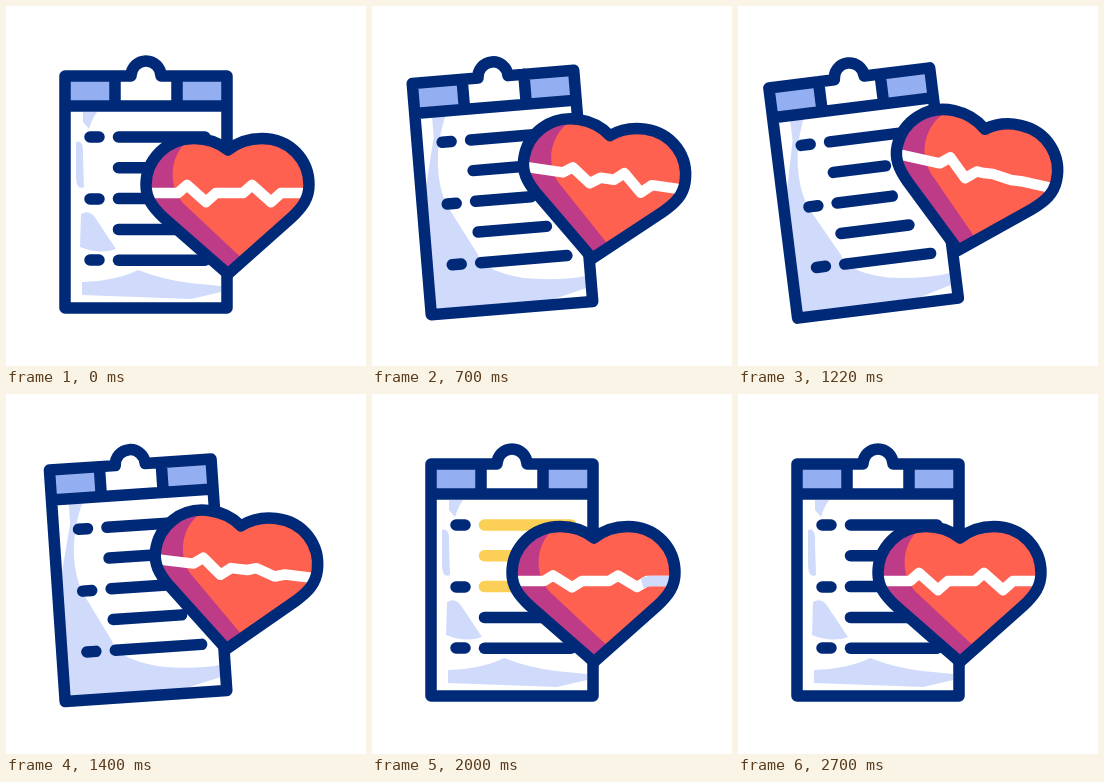
Animation of 360 by 360 pixels, one loop 3.02 s. Source, as an HTML page:

```html
<!DOCTYPE html>
<html>
<head>
<meta charset="utf-8">
<style>
  html, body { margin: 0; height: 100%; overflow: hidden; background: #fff; }
  svg { display: block; width: 100vw; height: 100vh; }
  .ink { fill: none; stroke: #002a78; stroke-width: 11.5; stroke-linecap: round; stroke-linejoin: round; }
  .shade { fill: #d0dbfc; }
</style>
</head>
<body>
<svg viewBox="0 0 360 360">
  <defs>
    <path id="heart" d="M222 144C212 136 200 132.500 188 132.500C160 132.500 140 154 140 179C140 192 146 201 158 212L222 268L285 212C297 201 303 192 303 179C303 154 284 132.500 256 132.500C244 132.500 232 136 222 144Z"/>
    <clipPath id="inside"><use href="#heart"/></clipPath>
  </defs>
  <g id="board">
    <path fill="#fff" d="M59 70H125A15 15 0 0 1 155 70H221V302H59Z"/>
    <path fill="#93aff1" d="M59 70H109V100H59ZM171 70H221V100H171Z"/>
    <path id="tiltShade" class="shade" d="M76 104H90C76 135 74 170 84 195L110 245Q112 262 154 273Q190 279 216 276V288L180 297H64V175L76 125Z"/>
    <path id="restShade" class="shade" d="M77 106H91Q86 113 83 123L77 116ZM70 136Q78 133 77 150L78 181Q70 185 70 170ZM75 208Q84 203 90 213L110 243Q94 249 74 241ZM76 276Q110 275 132 264Q158 274 184 277L215 280V286L185 293L76 289Z"/>
    <path class="ink" d="M59 70H125A15 15 0 0 1 155 70H221V302H59ZM59 100H221M109 70V100M171 70V100M84 131H93M84 193H93M84 254H93"/>
    <g id="lines"></g>
  </g>
  <g id="love">
    <use href="#heart" fill="#bd3b87"/>
    <g clip-path="url(#inside)">
      <path fill="#ff6151" d="M188 130C162 146 161 180 178 198L242 258L315 215V120H188Z"/>
      <g fill="none" stroke-width="10.500" stroke-linejoin="round">
        <path id="pulse" stroke="#fff"/>
        <path id="pulseEnd" stroke="#d0dbfc" d="M270 189L278 187H305"/>
      </g>
    </g>
    <use href="#heart" class="ink"/>
  </g>
</svg>
<script>
const LOOP = 3020;
const BASE = 187; // resting height of the heartbeat line
const $ = id => document.getElementById(id);

$('lines').innerHTML = [199, 165, 168, 181, 199]
  .map((end, i) => `<path class="ink" d="M112.500 ${131 + i * 30.8}H${end}"/>`).join('');
const lines = [...$('lines').children];

// Smooth rise from 0 to 1 and back, centred on a time
const bump = (t, centre, half) =>
  Math.abs(t - centre) < half ? (1 + Math.cos(Math.PI * (t - centre) / half)) / 2 : 0;

// One beat: lead-in, peak, trough, lead-out
const beat = (x, size) =>
  `L${x} ${BASE}L${x + 9} ${BASE - 8 * size}L${x + 28} ${BASE + 9 * size}L${x + 38} ${BASE}`;

const show = (id, visible) => { $(id).style.display = visible ? '' : 'none'; };

function draw(t) {
  const swing = bump(t, 1030, 700);
  $('board').setAttribute('transform', `rotate(${-8.6 * swing} 141 302)`);
  $('love').setAttribute('transform', `rotate(${15 * swing} 330 248)`);

  const tilted = swing > 0.12;
  show('tiltShade', tilted);
  show('restShade', !tilted);

  // The beats fade in turn and drift together while the heart leans
  const left = 1 - 0.7 * bump(t, 900, 320) - 0.6 * bump(t, 1750, 500);
  const right = 1 - 0.9 * bump(t, 1250, 380) - 0.5 * bump(t, 1800, 500);
  $('pulse').setAttribute('d',
    `M138 ${BASE}${beat(172 + 16 * swing, left)}${beat(237 - 8 * swing, right)}H305`);
  show('pulseEnd', t >= 1960 && t < 2080);

  lines.forEach((line, i) => {
    const on = t >= 1740 + i * 100 && t < 2140 + i * 100;
    line.style.stroke = on ? '#fccf56' : '';
  });
}

function loop() {
  draw(performance.now() % LOOP);
  requestAnimationFrame(loop);
}
loop();
</script>
</body>
</html>
```
